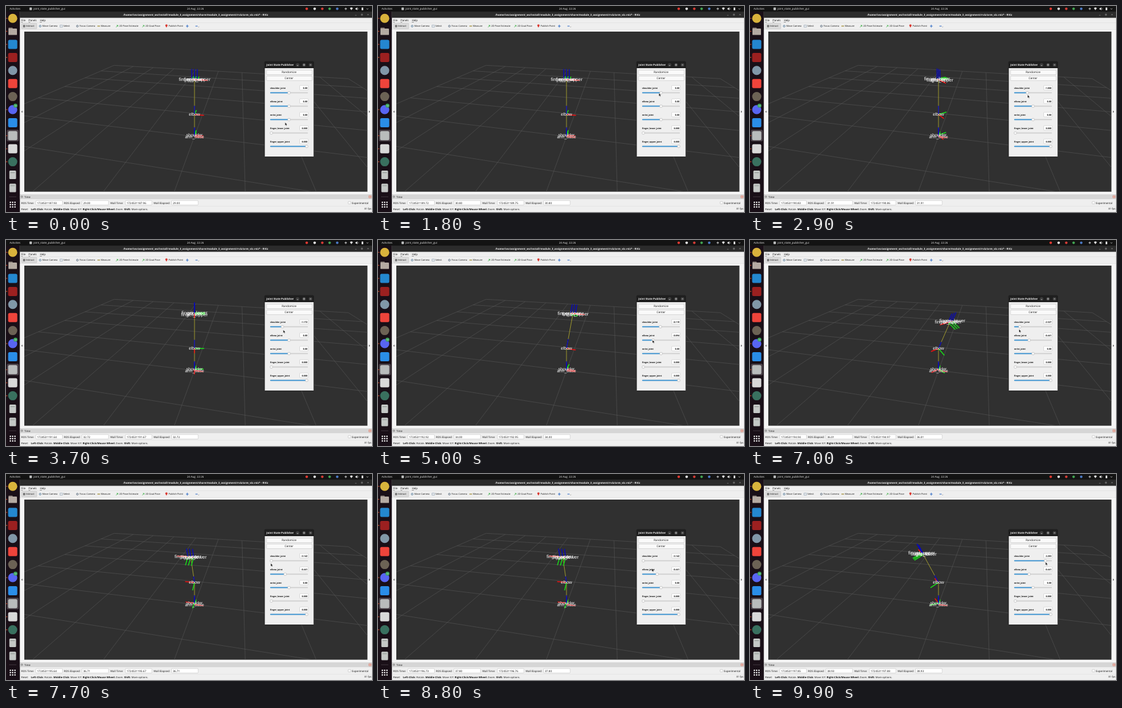
Recreate the animation shown at these times as an HTML page. Size 600 by 338 pixels, loop 10000 ms.

```html
<!DOCTYPE html>
<html lang="en">
<head>
<meta charset="utf-8">
<title>Joint state publisher</title>
<style>
html, body { margin: 0; width: 100%; height: 100%; overflow: hidden; background: #111; }
svg { display: block; width: 600px; height: 338px; }
text { font-family: "Open Sans", "Noto Sans", sans-serif; font-size: 4px; fill: #111; text-rendering: geometricPrecision; white-space: pre; }
.b { font-weight: 700; }
.w { fill: #f2f2f2; }
.tag { font-family: "Liberation Sans", Arial, sans-serif; fill: #fff; text-anchor: middle; }
</style>
</head>
<body>
<svg viewBox="0 0 600 338" xmlns="http://www.w3.org/2000/svg">
  <defs><clipPath id="view"><rect x="30" y="42" width="562.5" height="262.7"/></clipPath></defs>
  <g id="desk"></g>
  <g clip-path="url(#view)">
    <g id="grid" stroke="#5c5c5c" stroke-width=".5" fill="none"></g>
    <g id="arm"></g>
  </g>
  <g id="clock"></g>
  <g id="panel"></g>
  <g id="sliders"></g>
  <path id="cursor" d="M0 0V5L1.2 4 2 5.8 2.8 5.4 2 3.7H3.6Z" fill="#111" stroke="#fff" stroke-width=".35"/>
</svg>
<script>
const $ = id => document.getElementById(id);
const { sin, cos, floor, PI } = Math;

const rect = (x, y, w, h, fill, extra = "") =>
  `<rect x="${x}" y="${y}" width="${w}" height="${h}" fill="${fill}" ${extra}/>`;
const disc = (x, y, r, fill, extra = "") =>
  `<circle cx="${x}" cy="${y}" r="${r}" fill="${fill}" ${extra}/>`;
const path = (d, stroke, w = .6, fill = "none") =>
  `<path d="${d}" stroke="${stroke}" stroke-width="${w}" fill="${fill}"/>`;
const text = (x, y, s, size = 4, cls = "", anchor = "start") =>
  `<text x="${x}" y="${y}" class="${cls}" style="font-size:${size}px;text-anchor:${anchor}">${s}</text>`;

// ---- desktop and main window ----
function dock() {
  const icons = [
    ["o", "#d9b23c"], ["folder", "#b4aaa2"], ["s", "#2487d0"], ["s", "#9c2020"], ["o", "#8197a8"],
    ["s", "#ef443b"], ["o", "#6c6255"], ["o", "#5865f2"], ["s", "#2a8de8"], ["s", "#b9bcbc"],
    ["s", "#d8d8d8"], ["o", "#39705f"], ["bin", "#c4c8c6"], ["bin", "#c4c8c6"]
  ];
  let out = rect(0, 9, 22.5, 329, "#190f17") + rect(1.5, 203, 19.5, 19, "#4a4148", 'rx="2.5"');
  icons.forEach(([kind, fill], i) => {
    const y = 20.2 + i * 21.4;
    if (kind === "o") out += disc(11, y, 7.5, fill);
    else if (kind === "s") out += rect(3.5, y - 7.5, 15, 15, fill, 'rx="2.5"');
    else if (kind === "bin") out += rect(5.5, y - 7, 11, 14, fill, 'rx="1.5"') + rect(7.5, y - 4, 7, 1, "#8d9390");
    else out += rect(4, y - 6, 7, 4, "#8a7f78", 'rx="1"') + rect(4, y - 4.5, 14, 10.5, fill, 'rx="1.2"');
    if ([0, 1, 2, 3, 7, 9, 10, 11].includes(i)) out += disc(1.2, y, .8, "#e9542a");
  });
  out += disc(15.5, 163.5, 3.2, "#3ba55d") + text(15.5, 164.8, "18", 3.4, "w", "middle") +
    path("M5 313H17", "#5a5258", .6);
  for (let i = 0; i < 9; i++)
    out += rect(6 + i % 3 * 3.8, 321 + floor(i / 3) * 3.8, 2.2, 2.2, "#eee", 'rx=".4"');
  return out;
}

function topBar() {
  let out = rect(0, 0, 600, 9.2, "#131313") +
    text(6, 6.2, "Activities", 4.3, "w") + rect(38.5, 2.4, 4, 4.4, "#bfc1c1", 'rx=".7"') +
    text(45, 6.2, "joint_state_publisher_gui", 4.5, "w") +
    text(310.5, 6.2, "24 Aug  22:26", 4.4, "w", "middle");
  [[493, "#e03a32"], [506, "#e4e4e4"], [518.5, "#d43c36"], [530.5, "#42a552"], [543, "#4b79c4"]]
    .forEach(([x, c]) => out += disc(x, 4.6, 2.1, c));
  out += path("M555 4.6h4M557 2.6v4", "#eee", .8) +
    path("M564 3.6q2.2-2 4.4 0L566.2 6.6Z", "#eee", .4, "#eee") +
    path("M573 3.8h1.2l1.6-1.4v4.4l-1.6-1.4h-1.2Z", "#eee", .3, "#eee") + path("M577 3.3q1.2 1.3 0 2.6", "#eee", .5) +
    rect(583, 2.5, 2.6, 4.6, "#eee", 'rx=".5"') + path("M591 4l1.5 1.5 1.5-1.5", "#ddd", .7);
  return out;
}

function windowButtons(x, y, gap, stroke, back) {
  const [a, b, c] = [x, x + gap, x + 2 * gap];
  return [a, b, c].map(v => disc(v, y, 2.9, back)).join("") +
    path(`M${a - 1.1} ${y + 1}h2.2M${b - 1} ${y - 1}h2v2h-2ZM${c - 1} ${y - 1}l2 2M${c + 1} ${y - 1}l-2 2`, stroke, .55);
}

function toolbar() {
  const tools = [
    [60, "Move Camera", "#5b7f9e"], [94.5, "Select", "#8fa3b4"], [121, "Focus Camera", "#5d6f7f"],
    [156, "Measure", "#b6a86a"], [186, "2D Pose Estimate", "#3fae49"], [229, "2D Goal Pose", "#4fb457"],
    [267, "Publish Point", "#d8342c"]
  ];
  let out = rect(25.5, 28.2, 25, 9.3, "#dadada", 'rx="1" stroke="#b5b5b5" stroke-width=".4"') +
    rect(28, 31, 3.4, 4, "#777", 'rx="1"') + text(32.5, 34.4, "Interact", 3.9);
  tools.forEach(([x, name, c], i) => {
    const ix = x - 4;
    if (i === 3) out += rect(ix - 2.2, 32, 4.4, 1.8, c);
    else if (i === 1) out += rect(ix - 1.8, 31.2, 3.6, 3.6, "none", `stroke="${c}" stroke-width=".7"`);
    else if (i > 3 && i < 6) out += path(`M${ix - 1.6} 34.8l3-3m-2 0h2v2`, c, .9);
    else if (i === 6) out += path(`M${ix} 35.2l-1.6-2.8a1.7 1.7 0 1 1 3.2 0Z`, c, .2, c);
    else out += disc(ix, 33, 1.5, "none", `stroke="${c}" stroke-width=".9"`);
    out += text(x - .5, 34.4, name, 3.9);
  });
  return out + path("M295 33h4.4M297.2 30.8v4.4", "#3c74c8", 1.1) + path("M310.5 33h3.6", "#3c74c8", 1.1) +
    path("M315 33.8l.8.8.8-.8", "#444", .5);
}

function mainWindow() {
  const title = "/home/ivo/assignment_ws/install/module_3_assignment/share/module_3_assignment/rviz/arm_viz.rviz* - RViz";
  const keys = ["Left-Click:| Rotate. ", "Middle-Click:| Move X/Y. ", "Right-Click/Mouse Wheel:| Zoom. ", "Shift:| More options."];
  const hint = keys.map(k => k.replace(/(.*)\|/, '<tspan font-weight="700">$1</tspan>')).join("");
  const menu = (x, s) => text(x, 25, `<tspan text-decoration="underline">${s[0]}</tspan>${s.slice(1)}`, 4.4);
  return rect(22.5, 9, 577.5, 329, "#efefef") +
    rect(22.5, 9, 577.5, 10.4, "#2b2b2b") + text(311, 15.7, title, 4.35, "b w", "middle") +
    windowButtons(573.5, 14.2, 10, "#aaa", "none") +
    menu(25, "File") + menu(37, "Panels") + menu(55.5, "Help") +
    path("M22.5 27.4H600M22.5 38.8H600", "#d2d2d2", .4) + toolbar() +
    rect(22.5, 39, 577.5, 270, "#f5f5f5") + rect(30, 42, 562.5, 262.7, "#303030") +
    path("M27 171.6l-1.8 1.8 1.8 1.8ZM595 171.6l1.8 1.8-1.8 1.8Z", "none", 0, "#555") +
    rect(22.5, 309, 577.5, 8, "#d6d6d6") + disc(26, 313, 1.4, "none", 'stroke="#555" stroke-width=".5"') +
    path("M26 312.2v.9h.6", "#555", .4) + text(30, 314.7, "Time", 4.3) +
    rect(594.8, 311.1, 3.8, 3.8, "#f0d8d2", 'rx=".6" stroke="#cf5a42" stroke-width=".5"') +
    path("M595.9 312.2l1.6 1.6M597.5 312.2l-1.6 1.6", "#b83a28", .5) +
    rect(561, 320.8, 4, 4, "#fff", 'rx=".6" stroke="#999" stroke-width=".4"') + text(567, 324.6, "Experimental", 4.4) +
    path("M22.5 328.6H600", "#d4d4d4", .4) +
    text(25, 335, "Reset", 4.3) + text(41, 335, hint, 4.2) + text(599, 334, "31 fps", 4.2, "", "end");
}

// ---- publisher dialog ----
function dialog() {
  const button = (y, s) => rect(427, y, 75, 7.4, "#fafafa", 'rx="1" stroke="#b8b8b8" stroke-width=".5"') +
    text(464, y + 5.2, s, 4.6, "", "middle");
  return rect(423.5, 90.5, 81.5, 157, "#1f1f1f", 'rx="2.5"') + rect(424.3, 102, 80, 145, "#efefef") +
    text(427, 98.3, "Joint State Publisher", 4.4, "b w") + windowButtons(478, 96.6, 10.6, "#eee", "#3c3c3c") +
    button(105.2, "Randomize") + button(115, "Center");
}

function slider(y, name, label, part) {
  const x = 435 + 58 * part;
  return text(433, y + 1.5, name, 3.55, "b") +
    rect(481.5, y - 3.7, 14, 7.6, "#fff", 'rx="1" stroke="#bcbcbc" stroke-width=".5"') +
    text(494.2, y + 1.5, label, 3.7, "b", "end") +
    rect(433, y + 7.6, 62, 1.6, "#cfcfcf", 'rx=".8"') + rect(433, y + 7.6, x - 433, 1.6, "#3a94d4", 'rx=".8"') +
    disc(x, y + 8.4, 2.2, "#fbfbfb", 'stroke="#a5a5a5" stroke-width=".5"');
}

// ---- 3D scene: x along red, y along green, z up; camera distance is 1 ----
const YAW = .208, PITCH = .48, FOCAL = 316, DROP = .13;

function toCamera([x, y, z]) {
  const side = x * cos(YAW) + y * sin(YAW), away = y * cos(YAW) - x * sin(YAW);
  return [side, z * cos(PITCH) + away * sin(PITCH) - DROP, 1 + away * cos(PITCH) - z * sin(PITCH)];
}
const toScreen = ([x, y, z]) => [309 + FOCAL * x / z, 173 - FOCAL * y / z];
const project = p => toScreen(toCamera(p));
const segment = (a, b) => `M${a.map(v => v.toFixed(2))}L${b.map(v => v.toFixed(2))}`;

function gridLine(p, q) {
  const near = .06;
  let a = toCamera(p), b = toCamera(q);
  const cut = (from, to) => from.map((v, i) => v + (to[i] - v) * (near - from[2]) / (to[2] - from[2]));
  if (a[2] < near && b[2] < near) return "";
  if (a[2] < near) a = cut(a, b);
  if (b[2] < near) b = cut(b, a);
  return segment(toScreen(a), toScreen(b));
}

function grid() {
  const half = 1.25;
  let d = "";
  for (let i = -5; i <= 5; i++) {
    const k = i * half / 5;
    d += gridLine([k, -half, 0], [k, half, 0]) + gridLine([-half, k, 0], [half, k, 0]);
  }
  return `<path d="${d}"/>`;
}

const yawed = ([x, y, z], s) => [x * cos(s) - y * sin(s), x * sin(s) + y * cos(s), z];
const tilted = ([x, y, z], e) => [x, y * cos(e) - z * sin(e), y * sin(e) + z * cos(e)];
const add = (a, b) => a.map((v, i) => v + b[i]);

function arm(s, e) {
  const upper = v => yawed(tilted(v, e), s), lower = v => yawed(v, s), fixed = v => v;
  const elbow = [0, 0, .13];
  const tip = x => add(elbow, upper([x, 0, .177]));
  const joints = [
    ["arm_base", [0, 0, -.001], fixed, 7], ["shoulder", [0, 0, .009], lower, 7], ["elbow", elbow, upper, 7],
    ["finger_lower", tip(-.0122), upper, 7.8], ["gripper", tip(0), upper, 7.8], ["finger_upper", tip(.0122), upper, 7.8]
  ];
  const axes = [[[.047, 0, 0], "#f01010"], [[0, .047, 0], "#18dd18"], [[0, 0, .047], "#0a0ab4"]];
  const bars = [];
  let tags = "";
  for (const [name, at, turn, size] of joints) {
    const o = project(at);
    for (const [v, color] of axes) {
      const end = add(at, turn(v));
      bars.push({ depth: toCamera(end)[2], svg: path(segment(o, project(end)), color, 1.5) });
    }
    tags += `<text x="${o[0]}" y="${o[1] + 2.5}" class="tag" style="font-size:${size}px">${name}</text>`;
  }
  bars.sort((a, b) => b.depth - a.depth);
  const links = segment(project([0, 0, 0]), project(elbow)) + segment(project(elbow), project(tip(0)));
  return path(links, "#b9b22e", .8) + bars.map(b => b.svg).join("") + tags;
}

// ---- motion: [seconds, value...] ----
const shoulderKeys = [[2.3, 0], [2.7, -.6], [3.2, -1.62], [3.5, -1.58], [3.7, -1.172], [4.2, -.119], [6, -.119],
  [6.4, -.95], [6.8, -2.1], [7, -2.327], [7.6, -3.142], [9.1, -3.142], [9.4, -.7], [9.75, 2.203]];
const elbowKeys = [[4.6, 0], [4.8, -.3], [4.9, -.6], [5, -.894], [5.2, -1.1], [5.5, -.441]];
const cursorKeys = [[0, 457.5, 191], [.9, 457, 180], [1.8, 460.5, 143], [2.2, 464, 143], [2.7, 458.5, 145], [3.2, 450, 147],
  [3.7, 454.5, 147.5], [4.2, 463, 146], [4.55, 463.5, 164], [5, 450, 164], [5.2, 447, 164.5], [5.5, 457.5, 165],
  [6, 463, 144], [6.8, 443, 146], [7, 441, 146.5], [7.6, 433, 146], [8.3, 440, 150], [8.8, 449, 155],
  [9.1, 435, 143], [9.4, 457.5, 143.5], [9.75, 484.5, 144.5]];
const elapsedKeys = [[0, 29], [1.8, 30.8], [3.7, 32.72], [5, 34], [7, 36.01], [8.8, 37.8], [9.9, 38.93]];
const rosKeys = [[0, 87.93], [1.8, 89.72], [3.7, 91.64], [5, 92.92], [7, 94.94], [8.8, 96.73], [9.9, 97.85]];

function at(keys, t, col = 1) {
  if (t <= keys[0][0]) return keys[0][col];
  const i = keys.findIndex(k => k[0] >= t);
  if (i < 0) return keys[keys.length - 1][col];
  const a = keys[i - 1], b = keys[i];
  return a[col] + (b[col] - a[col]) * (t - a[0]) / (b[0] - a[0]);
}

function clock(t) {
  const field = (x, label, fx, value) => text(x, 324.6, label, 4.4) +
    rect(fx, 319.2, 43.5, 7.4, "#fff", 'rx="1" stroke="#b9b9b9" stroke-width=".5"') + text(fx + 2, 324.6, value, 4.5);
  const ros = at(rosKeys, t), elapsed = at(elapsedKeys, t).toFixed(2);
  const stamp = v => "17245311" + v.toFixed(2);
  return field(25, "ROS Time:", 49, stamp(ros)) + field(95, "ROS Elapsed:", 124.7, elapsed) +
    field(171, "Wall Time:", 195.7, stamp(ros + .03)) + field(242, "Wall Elapsed:", 271.5, elapsed);
}

const jointLabel = v => v === 0 ? "0.00" : v.toFixed(3);
const LAG = .1;

function draw(t) {
  const s = at(shoulderKeys, t), e = at(elbowKeys, t);
  $("arm").innerHTML = arm(at(shoulderKeys, t - LAG), at(elbowKeys, t - LAG));
  $("clock").innerHTML = clock(t);
  $("sliders").innerHTML =
    slider(134, "shoulder_joint", jointLabel(s), .5 + s / (2 * PI)) +
    slider(156, "elbow_joint", jointLabel(e), .5 + e / 4) +
    slider(178, "wrist_joint", "0.00", .5) +
    slider(200, "finger_lower_joint", "0.000", 0) +
    slider(222, "finger_upper_joint", "0.000", 1);
  $("cursor").setAttribute("transform", `translate(${at(cursorKeys, t, 1)} ${at(cursorKeys, t, 2)})`);
}

$("desk").innerHTML = mainWindow() + dock() + topBar();
$("grid").innerHTML = grid();
$("panel").innerHTML = dialog();

const start = performance.now();
let shown = -1;
function tick() {
  const step = floor((performance.now() - start) / 100) % 100;
  if (step !== shown) draw((shown = step) / 10);
  requestAnimationFrame(tick);
}
tick();
</script>
</body>
</html>
```
